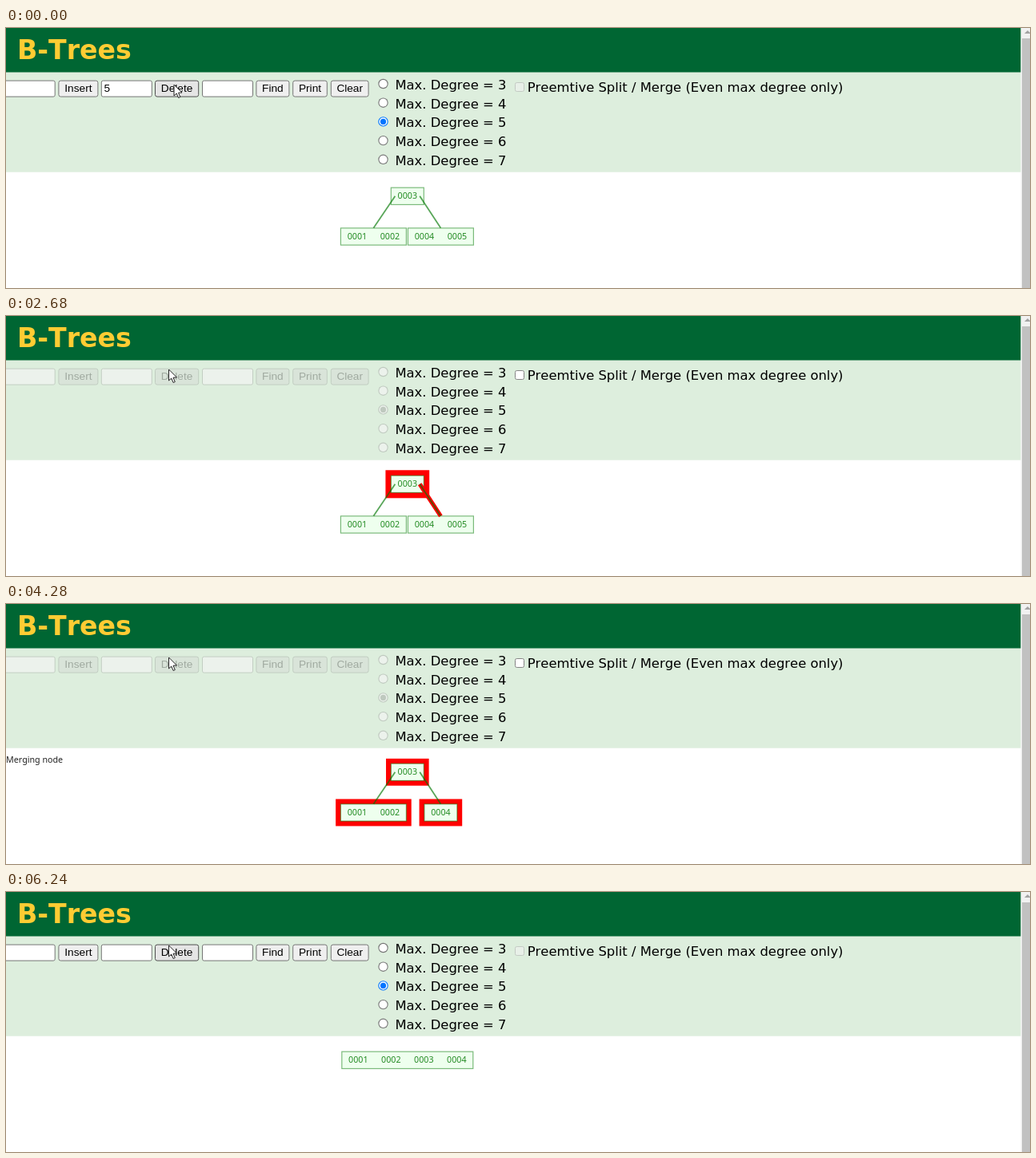
An HTML page with a canvas for the animation above (7080 ms loop, 1280 px wide and 326 px high).

```html
<!DOCTYPE html>
<html lang="en">
<head>
<meta charset="utf-8">
<title>B-Trees</title>
<style>
html, body { margin: 0; width: 100%; height: 100%; overflow: hidden; background: #fff; }
canvas { display: block; }
</style>
</head>
<body>
<canvas id="stage" width="1280" height="326"></canvas>
<script>
const ctx = document.getElementById('stage').getContext('2d');
const LOOP = 7080;
const GREEN = '#007700', RED = '#ff0000';
const LABEL = '16.4px "DejaVu Sans", sans-serif';
const TITLE = 'bold 33.2px "DejaVu Sans", sans-serif';
const CONTROL = '13.67px "Liberation Sans", sans-serif';
const KEY = '10.7px "Noto Sans", sans-serif';

// Phase starts in ms
const T = {
  press: 920, root: 1540, edge: 2180, leaf: 2720, mark: 3320,
  merge: 3920, join: 4520, joined: 5060, rise: 5620, end: 6240
};
const ROW_Y = 65.6, ROW_H = 21, ROW_BASE = 80;
const KEY_W = 41, NODE_H = 21.3;
const ROOT = { x: 501.8, y: 210.8 };
const LEFT = { x: 459.4, y: 261.5 };
const RIGHT = { x: 543.4, y: 261.5 };
const MID = { x: 501.8, y: 261.5 };

const mix = (a, b, p) => a + (b - a) * p;
const progress = (t, a, b) => Math.min(1, Math.max(0, (t - a) / (b - a)));

function text(str, x, y, font, color, align = 'left') {
  ctx.font = font;
  ctx.fillStyle = color;
  ctx.textAlign = align;
  ctx.fillText(str, x, y);
}

function rect(x, y, w, h, color) {
  ctx.fillStyle = color;
  ctx.fillRect(x, y, w, h);
}

function box(x, y, w, h, fill, border, r = 2) {
  ctx.beginPath();
  ctx.roundRect(x + 0.5, y + 0.5, w - 1, h - 1, r);
  ctx.fillStyle = fill;
  ctx.fill();
  ctx.strokeStyle = border;
  ctx.lineWidth = 1;
  ctx.stroke();
}

function disc(x, y, r, color) {
  ctx.beginPath();
  ctx.arc(x, y, r, 0, Math.PI * 2);
  ctx.fillStyle = color;
  ctx.fill();
}

function field(x, w, off) {
  box(x, ROW_Y, w, ROW_H, off ? '#ecf2ec' : '#ffffff', off ? '#c3cec3' : '#767676');
}

function button(label, x, w, off, hover) {
  const fill = off ? '#d9e4d9' : hover ? '#e5e5e5' : '#efefef';
  const border = off ? '#c1cdc1' : hover ? '#4f4f4f' : '#767676';
  box(x, ROW_Y, w, ROW_H, fill, border, 2.5);
  text(label, x + w / 2, ROW_BASE, CONTROL, off ? '#a0aaa0' : '#000000', 'center');
}

function radio(x, y, checked, off) {
  const ring = off ? '#bfc9bf' : checked ? '#0075ff' : '#767676';
  disc(x, y, 6.2, ring);
  disc(x, y, 5.1, off ? '#ecf2ec' : '#ffffff');
  if (checked) disc(x, y, 3.6, ring);
}

function page(off, typed) {
  rect(0, 0, 1280, 326, '#ffffff');
  rect(0, 0, 1268.6, 180.7, '#ddeedd');
  rect(0, 0, 1268.6, 55.5, '#006633');
  text('B-Trees', 14, 39, TITLE, '#ffcc33');

  field(-20, 81.7, off);
  button('Insert', 65.4, 50, off);
  field(118.8, 64, off);
  if (typed) text('5', 122.5, ROW_BASE, CONTROL, '#000000');
  button('Delete', 186, 55.2, off, true);
  field(245, 64, off);
  button('Find', 312.4, 42, off);
  button('Print', 358.2, 43.6, off);
  button('Clear', 405.8, 47.8, off);

  for (let i = 0; i < 5; i++) {
    const y = 70 + i * 23.7;
    radio(471.5, y, i === 2, off);
    text('Max. Degree = ' + (i + 3), 486.4, y + 7, LABEL, '#000000');
  }
  if (off) box(636, 68, 12, 12, '#ffffff', '#858585');
  else box(636, 68, 12, 12, '#e8f0e8', '#c3cac3');
  text('Preemtive Split / Merge (Even max degree only)', 651.7, 80, LABEL, '#000000');

  rect(1268.6, 0, 12, 326, '#f1f1f1');
  rect(1270, 13, 10, 313, '#c1c1c1');
  ctx.beginPath();
  ctx.moveTo(1277, 3);
  ctx.lineTo(1281, 7);
  ctx.lineTo(1273, 7);
  ctx.fillStyle = '#a3a3a3';
  ctx.fill();
}

// Highlight border swings between 3 and 7 units
function pulse(t) {
  const cycle = (((t - 1890) / 860) % 2 + 2) % 2;
  return 3 + 4 * (1 - Math.abs(1 - cycle));
}

function node(pos, keys, glow = 0, redKey = -1) {
  const w = keys.length ? keys.length * KEY_W : 10.3;
  const x = pos.x - w / 2, y = pos.y - NODE_H / 2;
  if (glow) {
    const d = glow * 1.03;
    rect(x - d, y - d, w + 2 * d, NODE_H + 2 * d, RED);
  }
  rect(x, y, w, NODE_H, '#eeffee');
  ctx.globalAlpha = 0.5;
  ctx.strokeStyle = GREEN;
  ctx.lineWidth = 1.2;
  ctx.strokeRect(x, y, w, NODE_H);
  ctx.globalAlpha = 1;
  keys.forEach((k, i) => keyText(k, x + (i + 0.5) * KEY_W, pos.y, i === redKey ? RED : GREEN));
}

function keyText(k, x, y, color = GREEN) {
  ctx.globalAlpha = 0.85;
  text(k, x, y + 3.3, KEY, color, 'center');
  ctx.globalAlpha = 1;
}

function edge(x1, x2, glow = 0) {
  const line = (w, color) => {
    ctx.lineWidth = w;
    ctx.strokeStyle = color;
    ctx.beginPath();
    ctx.moveTo(x1, ROOT.y);
    ctx.lineTo(x2, LEFT.y - NODE_H / 2);
    ctx.stroke();
  };
  if (glow) line(glow * 0.8, RED);
  ctx.globalAlpha = 0.65;
  line(1.8, GREEN);
  ctx.globalAlpha = 1;
}

function splitTree(t) {
  const glow = pulse(t);
  const merging = t >= T.merge;
  const rootOn = merging || (t >= T.root && t < T.leaf);
  const edgeOn = t >= T.edge && t < T.leaf;
  node(LEFT, ['0001', '0002'], merging ? glow : 0);
  node(RIGHT, merging ? ['0004'] : ['0004', '0005'], t >= T.leaf ? glow : 0, t >= T.mark ? 1 : -1);
  node(ROOT, ['0003'], rootOn ? glow : 0);
  edge(ROOT.x - 15.4, LEFT.x);
  edge(ROOT.x + 15.4, RIGHT.x, edgeOn ? glow : 0);
}

function joinedTree(t) {
  const done = t >= T.joined;
  const y = mix(MID.y, ROOT.y, progress(t, T.rise, T.end));
  node({ x: MID.x, y }, ['0001', '0002', done ? '0003' : '', '0004']);
  if (t < T.rise) {
    node(ROOT, []);
    edge(ROOT.x, MID.x);
  }
  if (!done) {
    const p = progress(t, T.join, T.joined);
    keyText('0003', mix(ROOT.x, MID.x + KEY_W / 2, p), mix(ROOT.y, MID.y, p));
  }
}

function message(t) {
  let str = '';
  if (t >= T.press && t < T.root) str = 'Deleting 0005';
  if (t >= T.merge && t < T.joined) str = 'Merging node';
  text(str, 0, 199, KEY, '#222222');
}

function cursor(t) {
  const up = progress(t, 840, 1000), back = progress(t, 1000, 1200);
  const x = mix(mix(210, 206, up), 203.5, back);
  const y = mix(mix(71, 59, up), 67, back);
  const shape = [[0, 0], [0, 14], [3.2, 11], [5.6, 16.5], [7.8, 15.5], [5.5, 10.2], [10, 10]];
  ctx.beginPath();
  shape.forEach(([dx, dy]) => ctx.lineTo(x + dx, y + dy));
  ctx.closePath();
  ctx.fillStyle = '#ffffff';
  ctx.fill();
  ctx.strokeStyle = '#222222';
  ctx.lineWidth = 1;
  ctx.stroke();
}

function draw(t) {
  page(t >= T.press && t < T.end, t < T.press);
  if (t < T.join) splitTree(t);
  else joinedTree(t);
  message(t);
  cursor(t);
}

ctx.fontKerning = 'none';
const start = performance.now();
function frame() {
  draw((performance.now() - start) % LOOP);
  requestAnimationFrame(frame);
}
frame();
</script>
</body>
</html>
```
